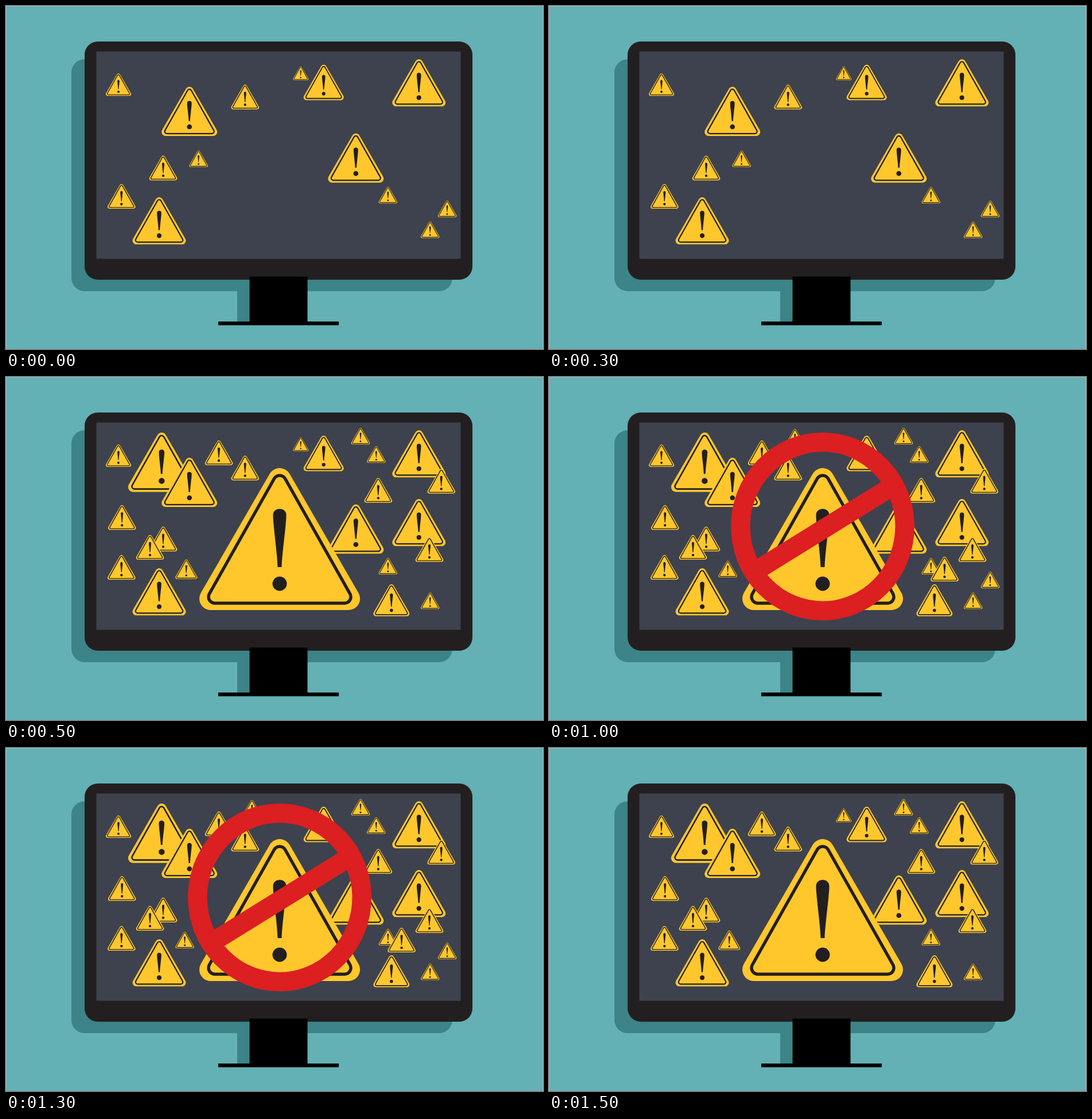
An HTML page for the animation above (2 s loop, 936x599 px).

```html
<!DOCTYPE html>
<html lang="en">
<head>
<meta charset="utf-8">
<title>Blocked warnings</title>
<style>
  html, body { margin: 0; width: 100%; height: 100%; overflow: hidden; background: #63b0b5; }
  svg { display: block; width: 936px; height: 599px; }
  .yellow { fill: #ffc72c; stroke: #ffc72c; }
  .black { fill: #231f20; stroke: #231f20; }
</style>
</head>
<body>
<svg viewBox="0 0 936 599">
  <rect width="936" height="599" fill="#63b0b5"/>
  <path d="M.5 599V.5H935.5V599" fill="none" stroke="#8dc6c9"/>
  <g fill="#3c8487">
    <rect x="114" y="93" width="664" height="405" rx="23"/>
    <rect x="403" y="490" width="30" height="62"/>
  </g>
  <rect x="137" y="62" width="676" height="416" rx="23" fill="#231f20"/>
  <rect x="157.5" y="79.5" width="635" height="362" fill="#3d424e"/>
  <path d="M424.5 472.5H525.5V551H580V557.5H370V551H424.5Z"/>
  <g id="signs"></g>
  <g data-steps="2" fill="none" stroke="#dc1f21" stroke-width="33.5">
    <ellipse cx="477" cy="261" rx="143.2" ry="147.2"/>
    <path d="M363 337L596.5 192"/>
  </g>
</svg>
<script>
  const signs = document.getElementById("signs");

  const triangle = (className, top, side, base, radius) =>
    `<path class="${className}" stroke-width="${2 * radius}" d="M0 ${top}L${side} ${base}H${-side}Z"/>`;

  // Apex at x, y; the outline is relatively heavier on small signs
  function sign(x, y, size) {
    const scale = size / 280, halfLine = (0.6 / scale + 4.8) / 2;
    return `<g transform="translate(${x} ${y}) scale(${scale})" stroke-linejoin="round">
      ${triangle("yellow", 20, 120, 228, 20)}
      ${triangle("black", 24, 113, 225, 11 + halfLine)}
      ${triangle("yellow", 24, 113, 225, 11 - halfLine)}
      <path fill="#231f20" d="M-11.5 82C-11.5 67.5 11.5 67.5 11.5 82C11.5 100 4 150 3.5 173H-3.5C-4 150 -11.5 100 -11.5 82Z"/>
      <circle fill="#231f20" cy="202" r="12.5"/>
    </g>`;
  }

  // Equal signs at the given points, shown during the given half-second steps
  function scatter(steps, size, points) {
    const drawn = points.split(" ").map(p => sign(...p.split(","), size));
    signs.innerHTML += `<g data-steps="${steps}">${drawn.join("")}</g>`;
  }

  const always = "0123", crowded = "123";
  const tiny = 32.5, small = 48.5, large = 93, larger = 97;

  scatter(crowded, 117, "271.3,97");
  scatter(always, larger, "319.7,141 609.8,222.5");
  scatter(always, large, "719.7,93 267,334");
  scatter(crowded, large, "719.7,213");
  scatter(always, 70, "553.7,102.5");
  scatter(crowded, 63, "671.8,362");
  scatter(always, small, "416.7,137.5 274,261.5 201.3,311");
  scatter(crowded, small, "371,111 648.8,176.5 758.7,160.5 738,280 202.2,224 251,276");
  scatter(always, 44, "196,118");
  scatter(always, tiny, "665.8,316 739.2,376.5");
  scatter(always, 27, "513.7,105.5");
  scatter(crowded, tiny, "618,89 645.3,121");
  scatter("0", tiny, "335.6,252.5");
  scatter("02", tiny, "769,340");
  scatter("13", 38, "314.3,319");
  scatter("2", tiny, "311.6,321 428.7,91");
  scatter("2", small, "689.5,314");
  scatter(crowded, 280, "477,159");

  const timed = document.querySelectorAll("[data-steps]");

  function draw() {
    const step = Math.floor(performance.now() % 2000 / 500);
    for (const el of timed)
      el.style.display = el.dataset.steps.includes(step) ? "" : "none";
    requestAnimationFrame(draw);
  }
  draw();
</script>
</body>
</html>
```
